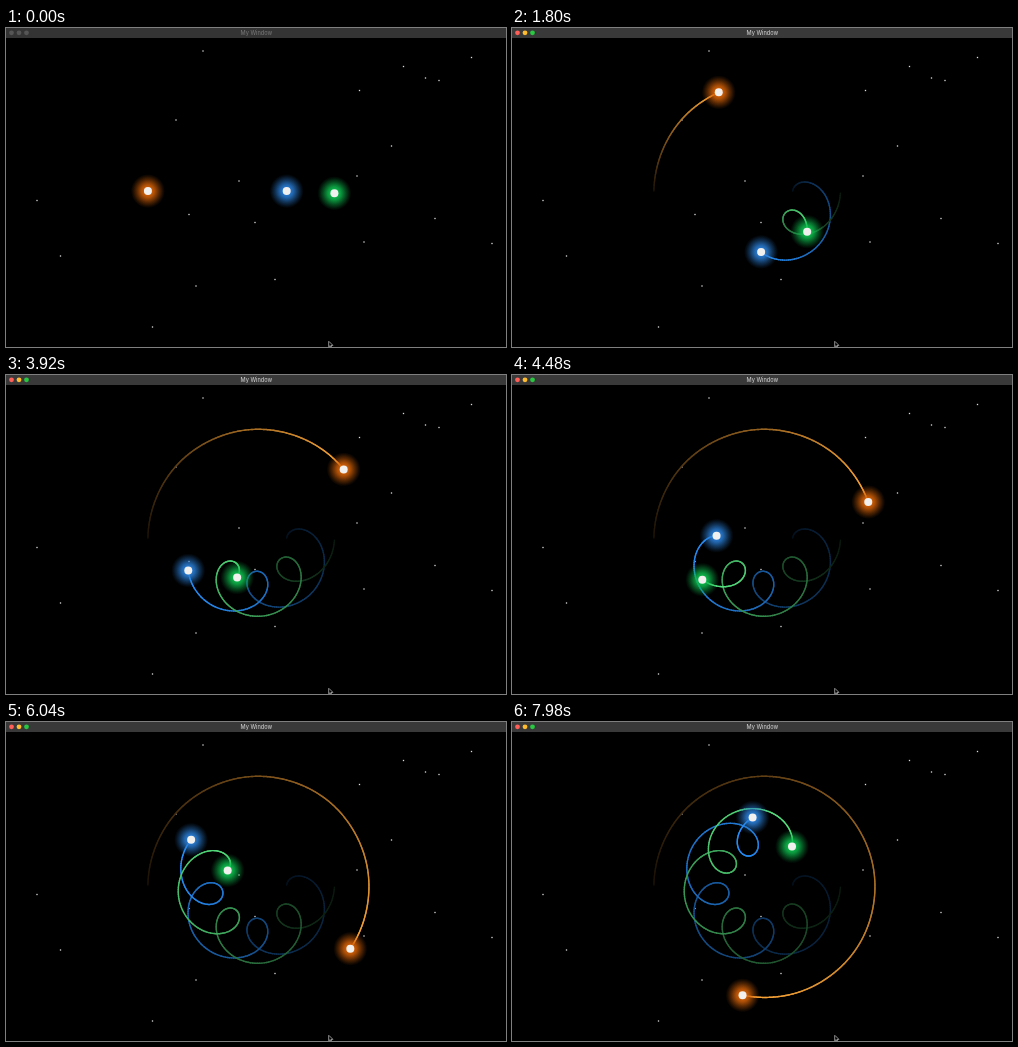
An HTML page with a canvas for the animation above (8 s loop, 500x319 px).

```html
<!DOCTYPE html>
<html lang="en">
<head>
<meta charset="utf-8">
<title>My Window</title>
<style>
  html, body { margin: 0; width: 100%; height: 100%; overflow: hidden; background: #000; }
  canvas { display: block; }
</style>
</head>
<body>
<canvas id="stage" width="500" height="319"></canvas>
<script>
const startTime = performance.now();
const ctx = document.getElementById('stage').getContext('2d');
const LOOP = 8000, FRAME = 20, SUBSTEPS = 4;
const STEP = FRAME / SUBSTEPS / 1000;

const bodies = [
  { trail: [255, 168, 56], glow: [214, 98, 8] },
  { trail: [40, 146, 255], glow: [42, 126, 214] },
  { trail: [88, 232, 130], glow: [14, 190, 78] }
];

// Time, then x and y of the orange, blue and green body
const waypoints = [
  [0, 142, 163, 281, 163, 328.5, 165],
  [1800, 207, 64.5, 249.5, 224, 295, 204],
  [2920, 282, 58, 258, 221, 211, 213],
  [3920, 337, 94, 182, 195.5, 231.5, 203],
  [5040, 363, 164, 210.5, 180.5, 177.5, 148],
  [6040, 344, 227, 185.5, 117, 221.5, 149],
  [7980, 231, 273, 240, 96, 280.5, 124]
];

const stars = [
  [197, 23], [170, 92], [31, 172.5], [54.5, 228], [183, 186.5], [190, 258], [146.5, 299],
  [233, 153], [249, 194.5], [269, 251.5], [351, 148], [358, 214], [385.5, 118], [353.5, 62.5],
  [397.5, 38.5], [419.5, 50], [433, 52.5], [465.5, 29.5], [429, 190.5], [486, 215.5]
];

// Equal masses under Newtonian gravity
function gravity(pos, gm) {
  const acc = [0, 0, 0, 0, 0, 0];
  for (let i = 0; i < 6; i += 2) {
    for (let j = i + 2; j < 6; j += 2) {
      const dx = pos[j] - pos[i], dy = pos[j + 1] - pos[i + 1];
      const d2 = dx * dx + dy * dy;
      const pull = gm / (d2 * Math.sqrt(d2));
      acc[i] += pull * dx; acc[i + 1] += pull * dy;
      acc[j] -= pull * dx; acc[j + 1] -= pull * dy;
    }
  }
  return acc;
}

// params: 6 positions, 6 velocities (px/s), gravity strength
function simulate(params, duration) {
  const pos = params.slice(0, 6), vel = params.slice(6, 12), gm = params[12];
  const path = [pos.slice()];
  let acc = gravity(pos, gm);
  for (let t = 0; t < duration; t += FRAME) {
    for (let s = 0; s < SUBSTEPS; s++) {
      for (let k = 0; k < 6; k++) {
        vel[k] += acc[k] * STEP / 2;
        pos[k] += vel[k] * STEP;
      }
      acc = gravity(pos, gm);
      for (let k = 0; k < 6; k++) vel[k] += acc[k] * STEP / 2;
    }
    path.push(pos.slice());
  }
  return path;
}

function residuals(params, points) {
  const path = simulate(params, points[points.length - 1][0]);
  return points.flatMap(([t, ...xy]) => xy.map((v, k) => path[t / FRAME][k] - v));
}

function solve(matrix, rhs) {
  const n = rhs.length;
  const m = matrix.map((row, i) => [...row, rhs[i]]);
  for (let c = 0; c < n; c++) {
    let pivot = c;
    for (let r = c + 1; r < n; r++) if (Math.abs(m[r][c]) > Math.abs(m[pivot][c])) pivot = r;
    [m[c], m[pivot]] = [m[pivot], m[c]];
    for (let r = c + 1; r < n; r++) {
      const f = m[r][c] / m[c][c];
      for (let k = c; k <= n; k++) m[r][k] -= f * m[c][k];
    }
  }
  const x = new Array(n).fill(0);
  for (let r = n - 1; r >= 0; r--) {
    let sum = m[r][n];
    for (let k = r + 1; k < n; k++) sum -= m[r][k] * x[k];
    x[r] = sum / m[r][r];
  }
  return x;
}

const dot = (a, b) => a.reduce((sum, v, i) => sum + v * b[i], 0);

// Levenberg-Marquardt: finds the launch state whose orbit meets the waypoints
function fitOrbit(guess, points, rounds) {
  let params = guess, res = residuals(params, points), cost = dot(res, res), damping = 0.01;
  for (let round = 0; round < rounds; round++) {
    const slopes = params.map((p, i) => {
      const eps = 1e-4 * Math.max(1, Math.abs(p));
      const moved = params.slice();
      moved[i] += eps;
      return residuals(moved, points).map((v, k) => (v - res[k]) / eps);
    });
    const rhs = slopes.map(s => -dot(s, res));
    const normal = slopes.map(a => slopes.map(b => dot(a, b)));
    for (let attempt = 0; attempt < 8; attempt++) {
      const damped = normal.map((row, i) => row.map((v, j) => i === j ? v * (1 + damping) : v));
      const delta = solve(damped, rhs);
      const next = params.map((p, i) => p + delta[i]);
      const nextRes = residuals(next, points), nextCost = dot(nextRes, nextRes);
      if (nextCost < cost) {
        params = next; res = nextRes; cost = nextCost;
        damping /= 5;
        break;
      }
      damping *= 5;
    }
  }
  return params;
}

let launch = [...waypoints[0].slice(1), 1, -67.5, 2.5, -45, -3.5, 112.5, 5.8e5];
launch = fitOrbit(launch, waypoints.slice(0, 4), 10);
launch = fitOrbit(launch, waypoints, 14);
const path = simulate(launch, LOOP);

const rgb = (color, scale = 1) => `rgb(${color.map(c => Math.round(c * scale))})`;

function disc(x, y, r, fill) {
  ctx.fillStyle = fill;
  ctx.beginPath();
  ctx.arc(x, y, r, 0, Math.PI * 2);
  ctx.fill();
}

function drawTrail(body, index, last) {
  ctx.lineWidth = 1.45;
  ctx.lineCap = 'round';
  for (let i = 1; i <= last; i++) {
    ctx.strokeStyle = rgb(body.trail, 0.1 + 0.9 * i / last);
    ctx.beginPath();
    ctx.moveTo(path[i - 1][index * 2], path[i - 1][index * 2 + 1]);
    ctx.lineTo(path[i][index * 2], path[i][index * 2 + 1]);
    ctx.stroke();
  }
}

function drawBody(body, x, y) {
  const glow = ctx.createRadialGradient(x, y, 3, x, y, 17);
  const stops = [[0, 1], [0.25, 0.8], [0.6, 0.38], [0.85, 0.12], [1, 0]];
  for (const [at, alpha] of stops) glow.addColorStop(at, `rgba(${body.glow},${alpha})`);
  disc(x, y, 17, glow);
  disc(x, y, 4, '#f2f0ee');
}

function drawTitleBar(active) {
  ctx.fillStyle = active ? '#393939' : '#343434';
  ctx.fillRect(0, 0, 500, 10);
  const lights = active ? ['#ff5f57', '#febc2e', '#28c840'] : ['#555', '#555', '#555'];
  lights.forEach((color, i) => disc(5.5 + 7.5 * i, 4.8, 2.4, color));
  ctx.fillStyle = active ? '#c4c4c4' : '#707070';
  ctx.font = '500 5.6px Inter, Roboto, sans-serif';
  ctx.textAlign = 'center';
  ctx.textBaseline = 'alphabetic';
  ctx.fillText('My Window', 250.4, 6.6);
}

function drawCursor() {
  const outline = [[0, 0], [0, 5.4], [1.3, 4.3], [2.2, 6.2], [3, 5.8], [2.2, 4], [3.8, 3.9]];
  ctx.beginPath();
  for (const [x, y] of outline) ctx.lineTo(322.7 + x, 313.5 + y);
  ctx.closePath();
  ctx.fillStyle = '#000';
  ctx.fill();
  ctx.strokeStyle = '#ccc';
  ctx.lineWidth = 0.7;
  ctx.stroke();
}

function draw() {
  const t = Math.max(0, performance.now() - startTime) % LOOP;
  const last = Math.floor(t / FRAME);
  ctx.fillStyle = '#000';
  ctx.fillRect(0, 0, 500, 319);
  ctx.fillStyle = '#ddd';
  for (const [x, y] of stars) ctx.fillRect(x - 0.65, y - 0.65, 1.3, 1.3);
  bodies.forEach((body, i) => drawTrail(body, i, last));
  bodies.forEach((body, i) => drawBody(body, path[last][i * 2], path[last][i * 2 + 1]));
  drawTitleBar(last > 0);
  drawCursor();
  requestAnimationFrame(draw);
}
draw();
</script>
</body>
</html>
```
